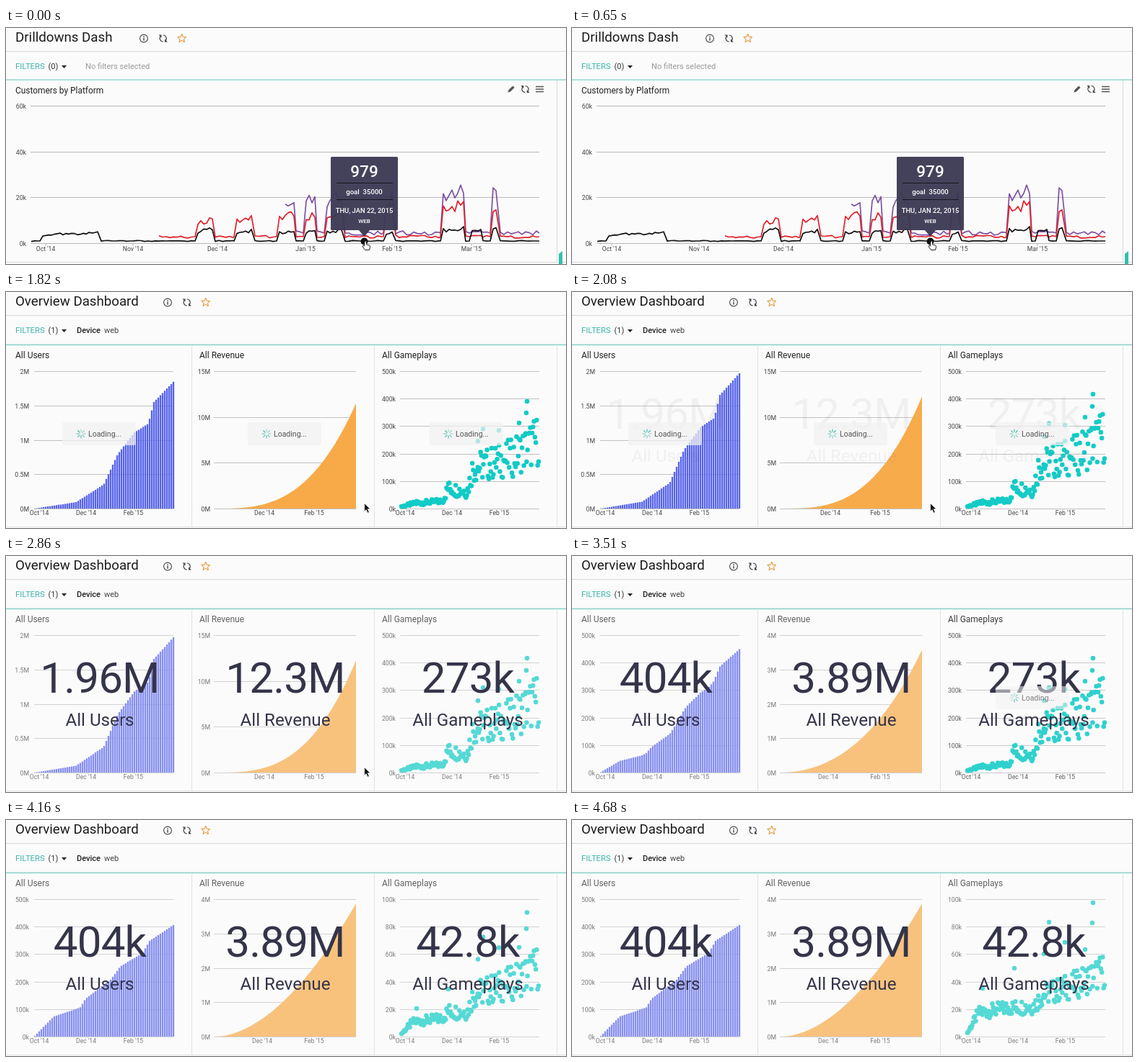
Recreate the animation shown at these times as an HTML page. Size 776 by 328 pixels, loop 4810 ms.

```html
<!DOCTYPE html>
<html lang="en">
<head>
<meta charset="utf-8">
<title>Dashboard drilldown</title>
<style>
html, body { margin: 0; width: 100%; height: 100%; overflow: hidden; background: #fbfbfb; }
svg { display: block; width: 776px; height: 328px; font-family: Roboto, "Open Sans", sans-serif; }
text { white-space: pre; }
.big { letter-spacing: -.8px; }
</style>
</head>
<body>
<svg id="stage" viewBox="0 0 776 328"></svg>
<script>
const LOOP = 4810, STEP = 130, TOP = 110, BASE = 301;
const TEAL = '#3fb5a8', INK = '#34344a';
const stage = document.getElementById('stage');

const clamp = v => Math.max(0, Math.min(1, v));
const ramp = (t, a, b) => clamp((t - a) / (b - a));
const mix = (a, b, k) => a + (b - a) * k;
const noise = i => { const v = Math.sin(i * 12.9898) * 43758.5453; return v - Math.floor(v); };

// Straight segments through key points [u, value]
function through(keys, u) {
  const i = Math.max(1, keys.findIndex(k => k[0] >= u));
  const [a, b] = [keys[i - 1], keys[i]];
  return mix(a[1], b[1], ramp(u, a[0], b[0]));
}

// ---- shapes ----
function text(x, y, s, size, fill = '#222', anchor = 'start', weight = 400, cls = '') {
  return `<text class="${cls}" x="${x}" y="${y}" font-size="${size}" fill="${fill}" text-anchor="${anchor}" font-weight="${weight}">${s}</text>`;
}
function path(d, stroke, width = 1, extra = '') {
  return `<path d="${d}" fill="none" stroke="${stroke}" stroke-width="${width}" ${extra}/>`;
}
const group = (op, body) => `<g opacity="${op}">${body}</g>`;

function refresh(x, y) {
  return `<g transform="translate(${x} ${y}) rotate(90)">` +
    path('M-4.5 0A4.5 4.5 0 0 1 3-3.4M4.5 0A4.5 4.5 0 0 1-3 3.4', '#444', 1.2) +
    '<path d="M1-2.2h4v-4zM-1 2.2h-4v4z" fill="#444"/></g>';
}

function star(x, y) {
  let d = '';
  for (let i = 0; i < 10; i++) {
    const a = i * Math.PI / 5, r = i % 2 ? 2.8 : 6.2;
    d += (i ? 'L' : 'M') + (x + r * Math.sin(a)).toFixed(1) + ' ' + (y - r * Math.cos(a)).toFixed(1);
  }
  return path(d + 'Z', '#e8a04c', 1.2, 'stroke-linejoin="round"');
}

function spinner(x, y, r, t, width) {
  let s = '';
  const turn = Math.round(t / STEP);
  for (let i = 0; i < 8; i++) {
    const a = i * Math.PI / 4, c = Math.cos(a), n = Math.sin(a);
    s += path(`M${x + c * r * .45} ${y + n * r * .45}L${x + c * r} ${y + n * r}`, TEAL, width,
      `opacity="${.45 + .55 * ((i - turn + 800) % 8) / 7}" stroke-linecap="round"`);
  }
  return s;
}

function header(title, iconX, count, ruleY) {
  return text(13, 19, title, 18.7, '#1c1c1c') +
    `<circle cx="${iconX}" cy="14.5" r="5.4" fill="none" stroke="#444" stroke-width="1.1"/>` +
    path(`M${iconX} 13.5v4M${iconX} 11v1.4`, '#444', 1.4) +
    refresh(iconX + 26.7, 14.5) + star(iconX + 52.7, 14.5) +
    path('M0 32.5H776', '#d6d6d6') +
    text(13, 57, 'FILTERS', 11.3, TEAL) + text(58.5, 57, `(${count})`, 11, '#333') +
    '<path d="M77 52h7l-3.5 4z" fill="#222"/>' +
    path(`M0 ${ruleY}H776`, '#93d6cd', 1.7);
}

function grid(x0, x1, labelX, labels, ticks, color = '#c2c2c2', top = TOP, base = BASE) {
  let s = '';
  labels.forEach((l, i) => {
    const y = Math.round(mix(top, base, i / (labels.length - 1))) + .5;
    s += path(`M${x0} ${y}H${x1}`, color) + text(labelX, y + 3.5, l, 8.7, '#444', 'end');
  });
  for (const [x, l] of ticks) s += text(x, 310, l, 8.6, '#444', 'middle');
  return s;
}

// ---- drilldown page ----
// start, end, then burst heights of the black, red and purple series
const bursts = [
  [47, 132, 13, 0, 0], [262, 290, 20, 30, 0], [316, 345, 17, 33, 0],
  [375, 402, 18, 38, 58], [412, 431, 18, 36, 60], [441, 470, 19, 38, 64],
  [523, 540, 16, 46, 66], [602, 637, 22, 54, 70], [642, 661, 21, 2, 3], [671, 685, 24, 55, 76]
];

function series(col, start, base, jitter, color) {
  const pts = [];
  const add = (x, y) => { if (x >= start) pts.push(x.toFixed(1) + ',' + y.toFixed(1)); };
  let x = 35;
  for (const b of [...bursts, [739, 739]]) {
    for (; x < b[0]; x += 5) add(x, base + (noise(x + col) - .5) * jitter);
    add(b[0], base);
    for (x = b[0] + 4; x < b[1] - 2; x += 4) {
      const u = (x - b[0]) / (b[1] - b[0]);
      add(x, base - b[col] * (.5 + .2 * u + .3 * noise(x * col)));
    }
    x = b[1];
  }
  return `<polyline points="${pts.join(' ')}" fill="none" stroke="${color}" stroke-width="1.7" stroke-linejoin="round"/>`;
}

function tooltip() {
  const label = (y, s, size) => text(496.5, y, s, size, '#fff', 'middle', 500);
  return '<path d="M451.5 179h90q1.5 0 1.5 1.5v99q0 1.5-1.5 1.5H504l-7.5 9-7.5-9h-37.500q-1.5 0-1.5-1.5v-99q0-1.5 1.5-1.5z" fill="#3d3b55" opacity=".96"/>' +
    path('M458 215.5H536M458 238.5H536', '#17161f') +
    label(207, '979', 22.5) + label(231, 'goal&#160; 35000', 9.6) +
    label(257, 'THU, JAN 22, 2015', 9.4) + label(271, 'WEB', 8) +
    '<circle cx="496.5" cy="296.5" r="5" fill="#111"/>' +
    '<path d="M497 297q1.5-1.5 2.5 0v4l3.5.8q2 .6 1.5 2.7l-1 4h-6l-3.5-5q0-2 2.5-.5z" fill="#fff" stroke="#222"/>';
}

function drillPage() {
  const months = [[55, "Oct '14"], [176, "Nov '14"], [293, "Dec '14"], [415, "Jan '15"], [535, "Feb '15"], [645, "Mar '15"]];
  return header('Drilldowns Dash', 191, 0, 72) +
    text(110, 57, 'No filters selected', 11.1, '#9a9a9a') +
    text(13, 91, 'Customers by Platform', 11.9) +
    '<path d="M695.5 89.5l1-3.4 5.7-5.7 2.4 2.4-5.7 5.7z" fill="#555"/>' + refresh(719.5, 85) +
    path('M734 81.5h11M734 85h11M734 88.5h11', '#555', 1.6) +
    path('M763.5 73V325M0 325.5H776', '#d9d9d9') +
    '<path d="M766 328v-14l5-4v18z" fill="#35bfae"/>' +
    grid(34, 739, 28, ['60k', '40k', '20k', '0k'], months, '#b9b9b9', 108, 299) +
    path(months.map(m => `M${m[0]} 300v3`).join(''), '#b9b9b9') +
    series(4, 387, 285, 6, '#7d51a3') + series(3, 211, 290, 4, '#e0202a') + series(2, 35, 296, 1.5, '#111') +
    tooltip();
}

// ---- dashboard page ----
const usersAll = [[0, 0], [.3, .05], [.5, .19], [.6, .43], [.72, .6], [.82, .67], [.86, .84], [1, 1]];
const usersWeb = [[0, 0], [.14, .18], [.33, .26], [.37, .34], [.55, .51], [.62, .63], [.78, .75], [.83, .86], [1, 1]];
const playsAll = [[0, 3], [.1, 8], [.3, 11], [.34, 30], [.48, 25], [.52, 60], [.8, 75], [1, 102]];
const playsWeb = [[0, 5], [.08, 33], [.3, 40], [.48, 42], [.55, 58], [.8, 73], [1, 92]];
// x, height before and after filtering
const peaks = [[569, 11, 67], [613, 37, 95], [654, 100, 115], [661, 118, 159], [683, 116, 131], [711, 127, 121], [722, 159, 186], [721, 142, 158]];

function bars(k, g) {
  let d = '';
  for (let x = 40; x < 233; x += 3) {
    const u = (x - 39) / 193;
    const h = g * mix(188 * through(usersAll, u), 155 * through(usersWeb, u), k);
    d += `M${x} ${BASE}v${-h.toFixed(1)}`;
  }
  return path(d, '#5662ea', 2.35);
}

function area(k, g) {
  let d = `M290 ${BASE}`;
  for (let i = 0; i <= 40; i++) {
    const u = i / 40, h = g * mix(156 * u ** 3, 185 * u ** 1.83, k);
    d += `L${(290 + 195 * u).toFixed(1)} ${(BASE - h).toFixed(1)}`;
  }
  return `<path d="${d}V${BASE}Z" fill="#f8aa49"/>`;
}

function dots(k, g) {
  let d = '';
  const dot = (x, a, b) => { d += `M${x.toFixed(1)} ${(BASE - g * mix(a, b, k)).toFixed(1)}h0`; };
  for (let i = 0; i < 150; i++) {
    const u = i / 149, n = noise(i + 3) * 2 - 1;
    dot(548 + 190 * u, through(playsAll, u) * (1 + .38 * n), through(playsWeb, u) * (1 + .27 * n));
  }
  for (const p of peaks) dot(...p);
  return path(d, '#10cbc6', 6.5, 'stroke-linecap="round"');
}

const longTicks = x => [[x, "Oct '14"], [x + 65, "Dec '14"], [x + 130.5, "Feb '15"]];
const thousands = ['500k', '400k', '300k', '200k', '100k', '0k'];

const panels = [
  { x: 13, mid: 130, box: 78, label: 'All Users', nums: ['1.96M', '404k'], draw: bars, from: 3380, to: 3640,
    grid: web => grid(39, 232, 32, web ? thousands : ['2M', '1.5M', '1M', '0.5M', '0M'], longTicks(46)) },
  { x: 268, mid: 387, box: 335, label: 'All Revenue', nums: ['12.3M', '3.89M'], draw: area, from: 3380, to: 3640,
    grid: web => grid(288, 485, 283, web ? ['4M', '3M', '2M', '1M', '0M'] : ['15M', '10M', '5M', '0M'],
      [[web ? 355 : 358, "Dec '14"], [427, "Feb '15"]]) },
  { x: 521, mid: 640, box: 587, label: 'All Gameplays', nums: ['273k', '42.8k'], draw: dots, from: 3900, to: 4420,
    grid: web => grid(546, 739, 540, web ? ['100k', '80k', '60k', '40k', '20k', '0k'] : thousands, longTicks(553)) }
];

function loadingBox(x, t, op) {
  return group(op, `<rect x="${x}" y="181" width="102" height="32" rx="3" fill="#f1f1f1" opacity=".72"/>` +
    spinner(x + 26, 197, 6, t, 1.2) + text(x + 36, 201, 'Loading...', 10.5, '#555'));
}

function panel(p, t) {
  const shown = ramp(t, 2066, 2340);
  const grow = ramp(t, 1430, 1950);
  const web = +(t >= p.from);
  const first = 1 - ramp(t, 2080, 2340);
  const second = .75 * Math.min(ramp(t, 3120, 3380), 1 - ramp(t, p.from, p.from + 130));
  const veil = Math.max(first, second);
  const chart = text(p.x, 92, p.label, 12) + p.grid(web) + p.draw(ramp(t, p.from, p.to), grow * (2 - grow));
  return group(mix(1, .7, shown) + .22 * second, chart) +
    group(shown, text(p.mid, 189.5, p.nums[web], 60, INK, 'middle', 400, 'big') +
      text(p.mid, 236, p.label, 24.2, INK, 'middle')) +
    (veil ? loadingBox(p.box, t, veil) : '');
}

function dashPage(t) {
  let s = header('Overview Dashboard', 224, 1, 73.3) +
    text(98, 57, 'Device', 11, '#222', 'start', 500) + text(136, 57, 'web', 11, '#444');
  if (t < 1430) {
    s += spinner(683, 297, 11, t, 2) + text(701, 304, 'Loading...', 20, '#6a6a72');
  } else {
    s += path('M257.5 75V327M510.5 75V327M763.5 75V327M0 326.5H776', '#e2e2e2');
    for (const p of panels) s += panel(p, t);
  }
  if (t < 3250) {
    s += '<path d="M496.5 293.5v11.5l2.6-2.4 2 4.6 2.2-1-2-4.4h3.6z" fill="#111" stroke="#fff" stroke-width=".8"/>';
  }
  return s;
}

let last = -1;
function tick(now) {
  const t = Math.floor((now % LOOP) / STEP) * STEP;
  if (t !== last) {
    last = t;
    stage.innerHTML = '<rect width="776" height="328" fill="#fbfbfb"/>' + (t < 910 ? drillPage() : dashPage(t));
  }
  requestAnimationFrame(tick);
}
tick(0);
</script>
</body>
</html>
```
